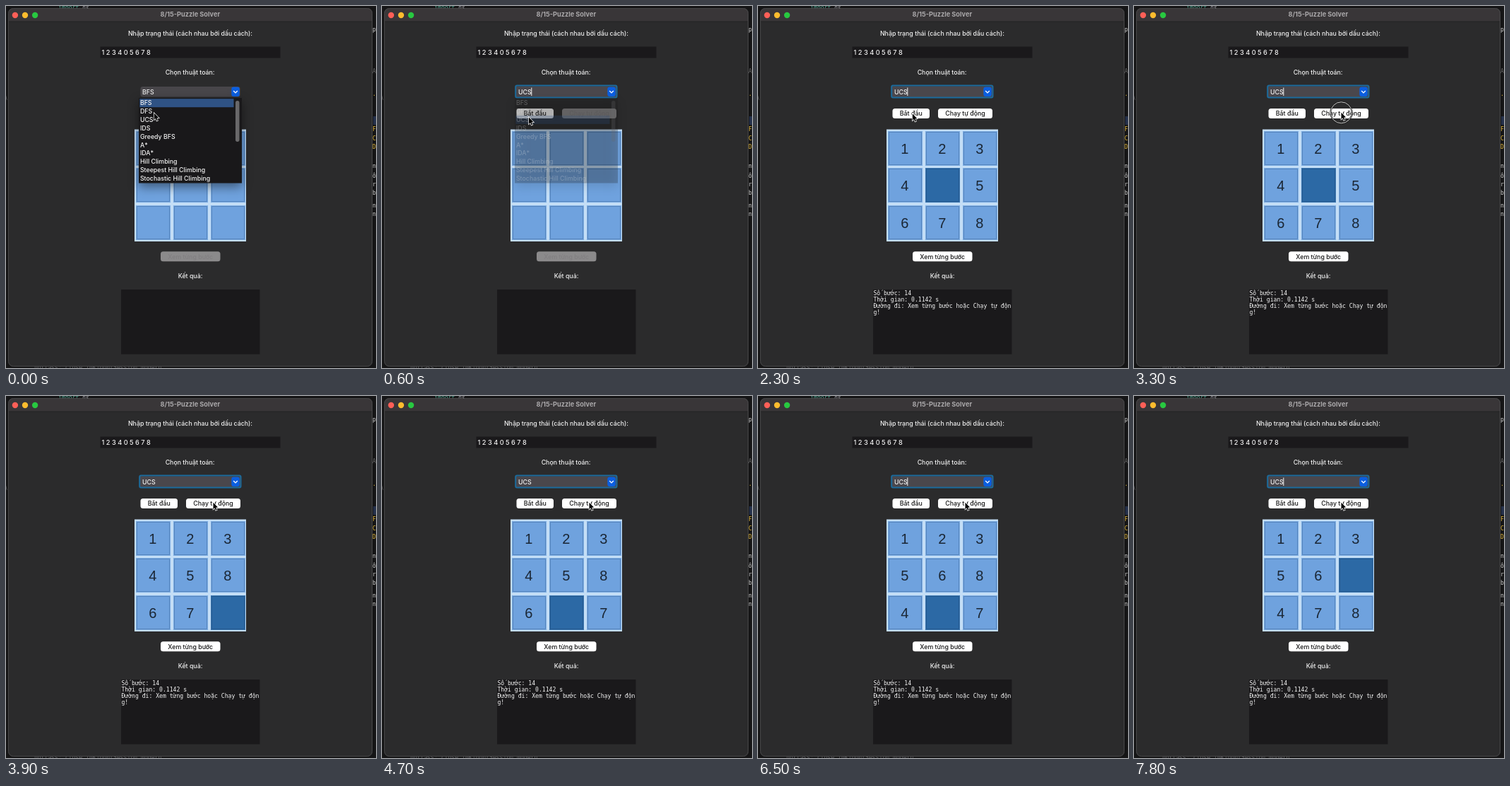
Animation, 524 px wide and 512 px high, one loop 8 s. Source, as an HTML page with a canvas:

```html
<!DOCTYPE html>
<html lang="vi">
<head>
<meta charset="utf-8">
<title>8/15-Puzzle Solver</title>
<style>
html, body { margin: 0; width: 100%; height: 100%; overflow: hidden; background: #151515; }
canvas { display: block; width: 524px; height: 512px; }
</style>
</head>
<body>
<canvas id="stage" width="524" height="512"></canvas>
<script>
const ctx = document.getElementById('stage').getContext('2d');
const LOOP = 8000, STEP = 100;
const UI = '500 8.8px Inter, "Open Sans", sans-serif';
const ENTRY = '500 9.2px Inter, "Open Sans", sans-serif';
const BOLD = '700 9.2px Inter, "Open Sans", sans-serif';
const MONO = '8.1px "DejaVu Sans Mono", monospace';
const CODE = 'italic 8.1px "DejaVu Sans Mono", monospace';
const DIGIT = '20px "Liberation Sans", Arial, sans-serif';

const ALGOS = ['BFS', 'DFS', 'UCS', 'IDS', 'Greedy BFS', 'A*', 'IDA*',
  'Hill Climbing', 'Steepest Hill Climbing', 'Stochastic Hill Climbing'];
const LOG = ['Số bước: 14', 'Thời gian: 0.1142 s',
  'Đường đi: Xem từng bước hoặc Chạy tự độn', 'g!'];

const PICK = 500, SOLVE = 1600, CLICK = 3200;
const START = [1, 2, 3, 4, 0, 5, 6, 7, 8];
// [time, tile that slides into the gap]
const MOVES = [[3400, 5], [3900, 8], [4400, 7], [4900, 6], [5400, 4],
  [6000, 5], [6500, 6], [7000, 7], [7500, 8]];
// caret hidden between each pair
const CARET_OFF = [[1100, 1400], [2000, 2300], [2900, 3200], [3800, 4100],
  [4700, 5000], [5600, 6000], [6600, 6900], [7500, 7800]];
// pointer glides: [start, end, x, y]
const GLIDES = [[0, 300, 208, 157.5], [900, 1300, 218.8, 152.5], [2500, 3100, 293.5, 150.8]];

function rect(x, y, w, h, color) {
  ctx.fillStyle = color;
  ctx.fillRect(x, y, w, h);
}

function round(x, y, w, h, r, color) {
  ctx.fillStyle = color;
  ctx.beginPath();
  ctx.roundRect(x, y, w, h, r);
  ctx.fill();
}

function frame(x, y, w, h, r, color, width) {
  ctx.strokeStyle = color;
  ctx.lineWidth = width;
  ctx.beginPath();
  ctx.roundRect(x, y, w, h, r);
  ctx.stroke();
}

// returns the width of the drawn text
function text(str, x, base, color = '#f2f2f2', font = UI, align = 'left') {
  ctx.font = font;
  ctx.fillStyle = color;
  ctx.textAlign = align;
  ctx.fillText(str, x, base);
  return ctx.measureText(str).width;
}

const label = (str, x, base) => text(str, x, base, '#f0f0f0', UI, 'center');

function drawDesktop() {
  rect(0, 0, 524, 512, '#151516');
  text('import', 74, 4.5, '#4fa08c', CODE);
  text('ns', 108, 4.5, '#a5a5ac', CODE);
  text('norlass: close imKinonrSession modern', 40, 513.5, '#5c5c60', MONO);
  text('A', -3, 133, '#55555a', MONO);
  rect(520, 156, 4, 12, '#24304a');
  [['p', 36, '#ccc'], ['A', 95, '#666'], ['.', 127, '#ddb43c'], ['F', 177, '#ddb43c'],
   ['C', 190, '#ddb43c'], ['D', 202, '#ddb43c'], ['n', 229, '#ccc'], ['ố', 243, '#ccc'],
   ['r', 255, '#ccc'], ['b', 267, '#ccc'], ['n', 285, '#ccc'], ['n', 297, '#ccc']]
    .forEach(([s, y, c]) => text(s, 519, y, c, MONO));
}

function drawWindow() {
  round(3, 3, 516, 507, 7, '#2b2b2c');
  round(3, 3, 516, 19, [7, 7, 0, 0], '#393638');
  rect(3.5, 21.5, 515, 1, '#222223');
  frame(3.5, 3.5, 515, 506, 7, '#484849', 1);
  ['#ff5f57', '#febc2e', '#28c840'].forEach((c, i) => {
    ctx.fillStyle = c;
    ctx.beginPath();
    ctx.arc(12.9 + 14.1 * i, 13, 4.2, 0, 7);
    ctx.fill();
  });
  text('8/15-Puzzle Solver', 260.8, 15.4, '#aaa8aa', BOLD, 'center');
  label('Nhập trạng thái (cách nhau bởi dấu cách):', 261, 41.6);
  rect(133.5, 57.5, 255, 16, '#1a191b');
  text('1 2 3 4 0 5 6 7 8', 135.6, 68.8, '#f2f2f2', ENTRY);
  label('Chọn thuật toán:', 260.6, 97.2);
  label('Kết quả:', 261, 384.6);
  rect(163, 401, 196.5, 91.5, '#1a191b');
}

function drawCombo(t) {
  const picked = t >= PICK;
  if (picked) {
    rect(190, 113.5, 142, 15.5, '#4a474c');
    frame(189.2, 112.5, 143.3, 17, 2, '#1c6b9c', 2);
  } else {
    round(190.5, 114, 141, 14.5, 3, '#48464a');
  }
  round(319.3, 114.5, 11.5, 13.5, 3, '#0b5ee0');
  ctx.strokeStyle = '#fff';
  ctx.lineWidth = 1.3;
  ctx.beginPath();
  ctx.moveTo(322.2, 120);
  ctx.lineTo(325, 122.9);
  ctx.lineTo(327.8, 120);
  ctx.stroke();
  text(picked ? 'UCS' : 'BFS', 193, 124.5);
  const hidden = CARET_OFF.some(([a, b]) => t >= a && t < b);
  if (picked && !hidden) rect(211.3, 115.5, 1, 11.5, '#f4f4f4');
}

function button(str, x, y, w, on) {
  round(x, y, w, 14, 3.5, on ? '#ffffff' : '#8b8a8b');
  text(str, x + w / 2, y + 10.2, on ? '#141414' : '#817f81', UI, 'center');
}

function boardAt(t) {
  const cells = START.slice();
  for (const [at, tile] of MOVES) {
    if (t < at) break;
    const gap = cells.indexOf(0), from = cells.indexOf(tile);
    cells[gap] = tile;
    cells[from] = 0;
  }
  return cells;
}

function drawBoard(t) {
  const solved = t >= SOLVE;
  rect(182, 174.5, 158, 158.5, '#c4def6');
  boardAt(t).forEach((n, i) => {
    const x = 184 + 53 * (i % 3), y = Math.floor(177 + 52.6 * Math.floor(i / 3));
    const gap = solved && n === 0;
    rect(x, y, 49, 49, gap ? '#2c69a5' : '#6fa2de');
    frame(x + 0.5, y + 0.5, 48, 48, 0, gap ? '#3a75af' : '#7dade3', 1);
    frame(x + 1.5, y + 1.5, 46, 46, 0, gap ? '#255a90' : '#5685bd', 1);
    if (solved && n) text(n, x + 23.8, y + 32, '#1b2735', DIGIT, 'center');
  });
}

function drawPopup(t) {
  const alpha = t < PICK ? 1 : t < PICK + 100 ? 0.6 : t < PICK + 200 ? 0.25 : 0;
  if (!alpha) return;
  ctx.globalAlpha = alpha;
  ctx.save();
  ctx.shadowColor = 'rgba(0, 0, 0, 0.45)';
  ctx.shadowBlur = 14;
  ctx.shadowOffsetY = 5;
  rect(188, 130, 146, 120.5, '#19181a');
  ctx.restore();
  round(325, 134, 5.5, 58, 2.7, '#69686a');
  const row = t < PICK ? 0 : 2, pitch = 11.85;
  rect(189.3, 131.2 + row * pitch, 133.2, 12, '#2f5284');
  ALGOS.forEach((s, i) => {
    const base = 140.3 + i * pitch;
    // the star is drawn apart, or the font lowers it next to capitals
    const name = s.replace('*', '');
    const w = text(name, 189.9, base);
    if (name !== s) text('*', 189.9 + w, base);
  });
  ctx.globalAlpha = 1;
}

function pointerAt(t) {
  let x = 209.8, y = 151.5;
  for (const [a, b, px, py] of GLIDES) {
    const p = Math.min(1, Math.max(0, (t - a) / (b - a)));
    const e = p * p * (3 - 2 * p);
    x += (px - x) * e;
    y += (py - y) * e;
  }
  return [x, y];
}

function drawPointer(t) {
  const [x, y] = pointerAt(t);
  if (t >= CLICK && t < CLICK + 200) {
    ctx.beginPath();
    ctx.arc(x, y, 15, 0, 7);
    ctx.strokeStyle = '#1a1a1a';
    ctx.lineWidth = 2.2;
    ctx.stroke();
    ctx.strokeStyle = '#c9c9c9';
    ctx.lineWidth = 1;
    ctx.stroke();
  }
  ctx.save();
  ctx.translate(x, y);
  ctx.beginPath();
  [[0, 0], [0, 9.4], [2.1, 7.5], [3.6, 11], [5.1, 10.3], [3.7, 7], [6.6, 6.8]]
    .forEach(p => ctx.lineTo(...p));
  ctx.closePath();
  ctx.strokeStyle = '#fff';
  ctx.lineWidth = 1.4;
  ctx.stroke();
  ctx.fillStyle = '#000';
  ctx.fill();
  ctx.restore();
}

function draw(now) {
  const t = Math.floor((now % LOOP) / STEP) * STEP;
  const solved = t >= SOLVE;
  drawDesktop();
  drawWindow();
  drawCombo(t);
  button('Bắt đầu', 190.5, 145, 52.5, true);
  button('Chạy tự động', 255, 145, 77, solved);
  button('Xem từng bước', 219, 347.3, 84.5, solved);
  drawBoard(t);
  if (solved) LOG.forEach((s, i) => text(s, 163.5, 408.8 + 9.1 * i, '#f4f4f4', MONO));
  drawPopup(t);
  drawPointer(t);
}

const begin = performance.now();
function tick() {
  draw(performance.now() - begin);
  requestAnimationFrame(tick);
}
tick();
</script>
</body>
</html>
```
